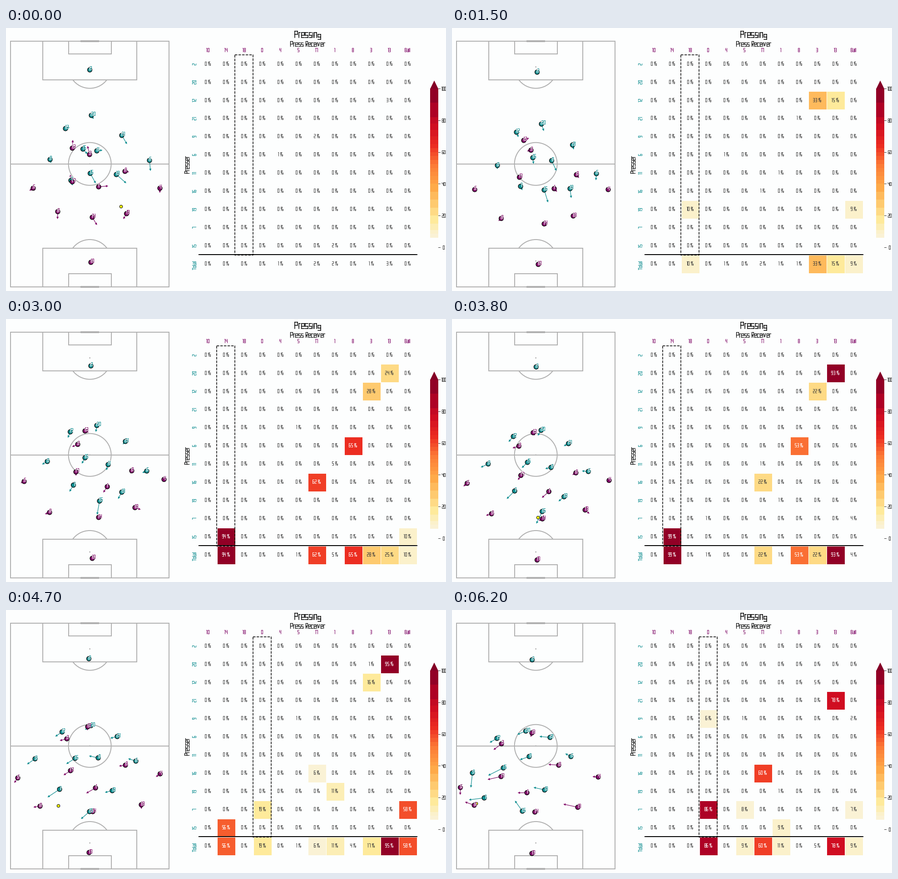
A matplotlib script that plays this animation: 969x578 px, repeating every 6.3 s.

```python
import numpy as np
import matplotlib.pyplot as plt
from matplotlib.animation import FuncAnimation
from matplotlib.collections import LineCollection
from matplotlib.colors import BoundaryNorm, LinearSegmentedColormap, ListedColormap
from matplotlib.patches import Arc, Circle, Polygon, Rectangle

W, H = 969, 578
FRAMES, STEP = 63, 100
BG, GREY, INK = "#fdfefe", "#b0b0b0", "#3a3a3a"
TEAL, PURPLE = "#0e8d90", "#800a68"
METRE = 5.138

# ------------------------------------------------------------------- motion
KEYS = [0, 1.5, 3, 4.7, 6.2]
players = []


def player(label, color, *places):
    """A player whose smooth run passes through one place per key time."""
    players.append((label, color, places))


player("2", TEAL, (184.5, 92), (187.5, 97), (187, 103), (182.5, 107), (176.5, 109.5))
player("20", TEAL, (188, 192), (197, 211), (200, 234), (187, 254), (162.5, 266))
player("12", TEAL, (131, 221), (142, 229), (141.5, 248), (123.5, 268), (99, 282))
player("21", TEAL, (255, 236), (265.5, 257), (263, 269), (245, 278), (216, 280))
player("9", TEAL, (97, 289), (100, 302), (91, 313), (64, 327), (45, 358))
player("6", TEAL, (316, 291), (318, 320), (310, 334), (286, 332), (262, 322))
player("11", TEAL, (200, 270), (219.5, 291.5), (225, 320), (203, 325), (170, 322))
player("16", TEAL, (169.5, 266), (178, 285), (174, 305), (152, 326), (113, 347))
player("19", TEAL, (243, 322), (260, 353), (255, 380.5), (234, 397), (204, 395.5))
player("7", TEAL, (143, 335), (151, 348), (148.5, 365), (118, 394), (71, 413))
player("15", TEAL, (185.5, 319.5), (203, 356), (206, 400), (184, 443), (155, 442))
player("10", PURPLE, (187, 515), (190, 519.5), (190, 526), (183, 533), (176, 535))
player("14", PURPLE, (190, 416), (203, 430.5), (204, 436), (191, 443), (182.5, 444))
player("18", PURPLE, (265.5, 408), (267, 413), (284, 414.5), (298, 428), (277, 433.5))
player("0", PURPLE, (114, 403.5), (108.5, 418.5), (96, 425), (75, 431), (49, 429))
player("4", PURPLE, (339, 352), (344, 355), (348, 352.5), (339.5, 360), (322, 367))
player("5", PURPLE, (60, 352), (50, 355), (40, 357), (26, 369), (18.5, 390))
player("17", PURPLE, (146, 338), (148.5, 328), (154, 336), (142, 353), (108, 366))
player("1", PURPLE, (204, 349), (225, 353), (223, 368.5), (197, 391), (165, 401.5))
player("8", PURPLE, (262, 315), (274, 322.5), (277, 333.5), (263, 341), (235, 341))
player("3", PURPLE, (184, 278), (174, 268.5), (158, 275.5), (134, 283), (109, 294))
player("13", PURPLE, (146, 264), (158, 247), (174, 246), (180, 256.5), (176, 270))

labels, colors, runs = zip(*players)
SIDE = colors.count(TEAL)
PRESSERS, RECEIVERS = labels[:SIDE], labels[SIDE:] + ("Ball",)
curves = np.polyfit(KEYS, np.array(runs).swapaxes(0, 1).reshape(len(KEYS), -1), 4)
POWERS = np.arange(4, -1, -1)


def squad(t):
    """Places and velocities per second of all players."""
    place = t ** POWERS @ curves
    speed = (POWERS[:-1] * t ** POWERS[1:]) @ curves[:-1]
    return place.reshape(-1, 2), speed.reshape(-1, 2)


BALL = np.array([(0, 253, 392), (1.5, 268, 411), (2.3, 274, 412), (3, 205, 436),
                 (3.8, 189, 436), (4.7, 115, 429.5), (6.2, 53, 425)])


def ball_at(t):
    return np.array([np.interp(t, BALL[:, 0], BALL[:, k]) for k in (1, 2)])


def target(t):
    return RECEIVERS.index("18" if t < 2.25 else "14" if t < 4.25 else "0")


# ----------------------------------------------------------------- pressing
REACTION, TOP_SPEED, LIMIT, STEEP = 0.7, 9, 1.55, 7


def table(t):
    """Chance in percent to intercept in time, closed by combined totals."""
    place, speed = squad(t)
    now, soon = ball_at(t), ball_at(t + 0.1)
    ahead = np.vstack([place[SIDE:] + speed[SIDE:], now + 10 * (soon - now)])
    start, run = place[:SIDE, None], speed[:SIDE, None]
    way = ahead - start
    pace = np.hypot(*np.moveaxis(run, -1, 0)) + 1e-9
    cos = (run * way).sum(-1) / (pace * np.hypot(*np.moveaxis(way, -1, 0)) + 1e-9)
    turn = pace / METRE * np.arccos(np.clip(cos, -1, 1)) / np.pi
    rest = ahead - start - run * REACTION
    delay = np.hypot(*np.moveaxis(rest, -1, 0)) / METRE / TOP_SPEED
    cells = 1 / (1 + np.exp(STEEP * (turn + REACTION + delay - LIMIT)))
    total = 1 - np.prod(1 - cells, axis=0)
    return 100 * np.vstack([cells, total])


LEVELS = np.r_[6, 8.5, 11, 15:40:5, 40:70:2.5, 70:82:4, 82:101:9]
shade = LinearSegmentedColormap.from_list("press", [
    (0, "#fbf5dc"), (0.08, "#faf2d4"), (0.17, "#feeb9c"), (0.27, "#fecb71"),
    (0.38, "#fea948"), (0.52, "#fc7a36"), (0.64, "#ec2c21"),
    (0.76, "#d00d21"), (0.88, "#aa0026"), (1, "#840026")])
mids = (LEVELS[1:] + LEVELS[:-1]) / 200
cmap = ListedColormap(shade(mids)).with_extremes(under=BG, over=shade(1.0))
norm = BoundaryNorm(LEVELS, len(mids))

# ---------------------------------------------------------------- lettering
# Letters are narrow segment displays; strokes live in a unit box, y up.
STROKES = {
    "a": [(0, 1), (1, 1)], "b": [(1, 1), (1, .5)], "c": [(1, .5), (1, 0)],
    "d": [(0, 0), (1, 0)], "e": [(0, 0), (0, .5)], "f": [(0, .5), (0, 1)],
    "g": [(0, .5), (1, .5)], "m": [(.5, 0), (.5, 1)], "x": [(.4, .5), (1, 0)],
    "v": [(0, 1), (.5, 0), (1, 1)], "i": [(0, 1.3), (0, 1.33)],
    "/": [(.2, 0), (.8, 1)],
    "u": [(0, .6), (0, 1), (.4, 1), (.4, .6), (0, .6)],
    "z": [(.6, 0), (.6, .4), (1, .4), (1, 0), (.6, 0)],
}
LETTERS = {
    "0": "abcdef", "1": "abc", "2": "abged", "3": "abgcd", "4": "fgbc",
    "5": "afgcd", "6": "afgcde", "7": "abc", "8": "abcdefg", "9": "abcdfg",
    "%": "u/z", " ": "", "P": "abefg", "R": "abefgx", "B": "abcdefg", "T": "am",
    "a": "abcdeg", "c": "adef", "e": "abdefg", "g": "abcdfg", "i": "efi",
    "l": "ef", "n": "abcef", "o": "abcdef", "r": "aef", "s": "acdfg",
    "t": "defg", "v": "v",
}
WIDTHS = {" ": 1, "i": 0, "l": 0, "1": 1, "r": 2, "t": 2, "%": 5, "T": 4}
CAP, LOW, GAP = 8, 6, 1.5
cache = {}


def outline(text):
    """Strokes of a word around its centre, y down, and its width."""
    if text not in cache:
        strokes, x = [], 0
        for ch in text:
            width = WIDTHS.get(ch, 3)
            tall = LOW if ch in "aceginorsv" else CAP
            base = CAP / 2 + (2 if ch == "g" else 0)
            for name in LETTERS[ch]:
                strokes.append(np.array(STROKES[name]) * (width, -tall) + (x, base))
            x += width + GAP
        x -= GAP
        cache[text] = [s - (x / 2, 0) for s in strokes], x
    return cache[text]


def word(text, x, y, size=1.0, upright=False, left=False):
    strokes, width = outline(text)
    if left:
        x += width * size / 2
    if upright:
        strokes = [np.column_stack([s[:, 1], -s[:, 0]]) for s in strokes]
    return [s * size + (x, y) for s in strokes]


def lettering(segments, color, lw=1.0, z=6):
    lines = LineCollection(segments, colors=color, linewidths=lw, zorder=z,
                           joinstyle="miter", capstyle="projecting")
    ax.add_collection(lines, autolim=False)
    return lines


# -------------------------------------------------------------------- stage
fig = plt.figure(figsize=(W / 72, H / 72), dpi=72, facecolor=BG)
ax = fig.add_axes([0, 0, 1, 1])
ax.set_xlim(0, W)
ax.set_ylim(H, 0)
ax.axis("off")

# pitch, measured in metres from the goal lines
CX, TOP, BOTTOM = 184.6, 29, 568.5
CY, HALF, R = (TOP + BOTTOM) / 2, 34 * METRE, 9.15 * METRE
line = dict(ec=GREY, lw=2, zorder=1)


def area(half, y, depth):
    ax.add_patch(Rectangle((CX - half, y), 2 * half, depth, fill=False, **line))


def spot(y):
    ax.add_patch(Circle((CX, y), 1.4, fc=GREY, ec="none", zorder=1))


area(HALF, TOP, BOTTOM - TOP)
for goal, way in ((TOP, METRE), (BOTTOM, -METRE)):
    area(20.16 * METRE, goal, 16.5 * way)
    area(9.16 * METRE, goal, 5.5 * way)
    spot(goal + 11 * way)
    ax.plot(CX + 3.66 * METRE * np.array([-1, 1]), [goal, goal], color=GREY,
            lw=4, zorder=1, solid_capstyle="projecting")
    turn = 90 if way > 0 else 270
    ax.add_patch(Arc((CX, goal + 11 * way), 2 * R, 2 * R, theta1=turn - 53,
                     theta2=turn + 53, **line))
ax.add_patch(Circle((CX, CY), R, fill=False, **line))
spot(CY)
ax.plot([CX - HALF, CX + HALF], [CY, CY], color=GREY, lw=2, zorder=1)

# table
X0, Y0, CELL = 424.9, 58.9, 39.97
xe = X0 + CELL * np.arange(len(RECEIVERS) + 1)
ye = Y0 + CELL * np.arange(len(PRESSERS) + 2)
xc, yc = (xe[1:] + xe[:-1]) / 2 - 1, (ye[1:] + ye[:-1]) / 2 - 1.3
mesh = ax.pcolormesh(xe, ye, table(0), cmap=cmap, norm=norm,
                     edgecolors=BG, linewidth=0.5, zorder=1)
ax.plot([X0, xe[-1]], [498.3, 498.3], color="black", lw=2, zorder=4)
marked = ax.add_patch(Rectangle((0, 58.5), CELL, 440, fill=False, ec="black",
                                lw=1.5, ls="--", zorder=5))
figures = lettering([], INK, 0.9)

lettering(word("Pressing", 664.5, 14, 1.85), "black", 1.5)
lettering(word("Press Receiver", 664, 34.5, 1.38), "black", 1.2)
lettering(word("Presser", 398, 300.5, 1.35, upright=True), "black", 1.2)
for name, x in zip(RECEIVERS, xc):
    lettering(word(name, x, 48), PURPLE)
for name, y in zip(PRESSERS, yc):
    lettering(word(name, 413.8, y + 1.5, upright=True), TEAL)
lettering(word("Total", 413.8, yc[-1] + 5, upright=True), TEAL)

# colour scale
ZERO, UNIT, LEFT, RIGHT = 482, 3.49, 934.4, 951.8
ax.pcolormesh([LEFT, RIGHT], ZERO - UNIT * LEVELS, LEVELS[:-1, None],
              cmap=cmap, norm=norm, zorder=1)
ax.add_patch(Polygon([(LEFT, 133.2), (RIGHT, 133.2), ((LEFT + RIGHT) / 2, 115.5)],
                     fc=shade(1.0), ec="none", zorder=1))
for value in range(0, 101, 20):
    y = ZERO - UNIT * value
    ax.plot([952.5, 956.5], [y, y], color=INK, lw=1)
    lettering(word(str(value), 963.5, y, 0.95), INK)

# moving parts
places, speeds = squad(0)
arrows = ax.quiver(*places.T, *speeds.T, color=colors, angles="xy",
                   scale_units="xy", scale=1, units="dots", width=1.2,
                   headwidth=4.2, headlength=4.2, headaxislength=4.2, zorder=2)
ball = ax.scatter([0], [0], s=42, c="#ffff00", edgecolors="black",
                  linewidths=1, zorder=3)
dots = ax.scatter(*places.T, s=100, c=colors, edgecolors="black",
                  linewidths=1.2, zorder=4)
halo = lettering([], "white", 2.4, 7)
tags = lettering([], TEAL, 1, 8)


def write(lines, words):
    """Fill a line collection with (strokes, colour) words."""
    lines.set_segments([s for strokes, _ in words for s in strokes])
    lines.set_color([c for strokes, c in words for _ in strokes])


def draw(frame):
    t = frame * STEP / 1000
    where, speed = squad(t)
    dots.set_offsets(where)
    arrows.set_offsets(where)
    arrows.set_UVC(*speed.T)
    ball.set_offsets([ball_at(t)])

    names = [word(label, x + 0.5, y - 3.5, left=True)
             for label, (x, y) in zip(labels, where)]
    write(tags, list(zip(names, colors)))
    halo.set_segments(sum(names, []))

    values = table(t)
    mesh.set_array(values)
    write(figures, [(word(f"{v:.0f} %", xc[c], yc[r]), "white" if v >= 50 else INK)
                    for (r, c), v in np.ndenumerate(values)])
    marked.set_x(X0 - 0.4 + CELL * target(t))
    return dots, arrows, ball, halo, tags, mesh, figures, marked


anim = FuncAnimation(fig, draw, frames=FRAMES, interval=STEP, repeat=True,
                     repeat_delay=0, blit=False)
plt.show()
```
